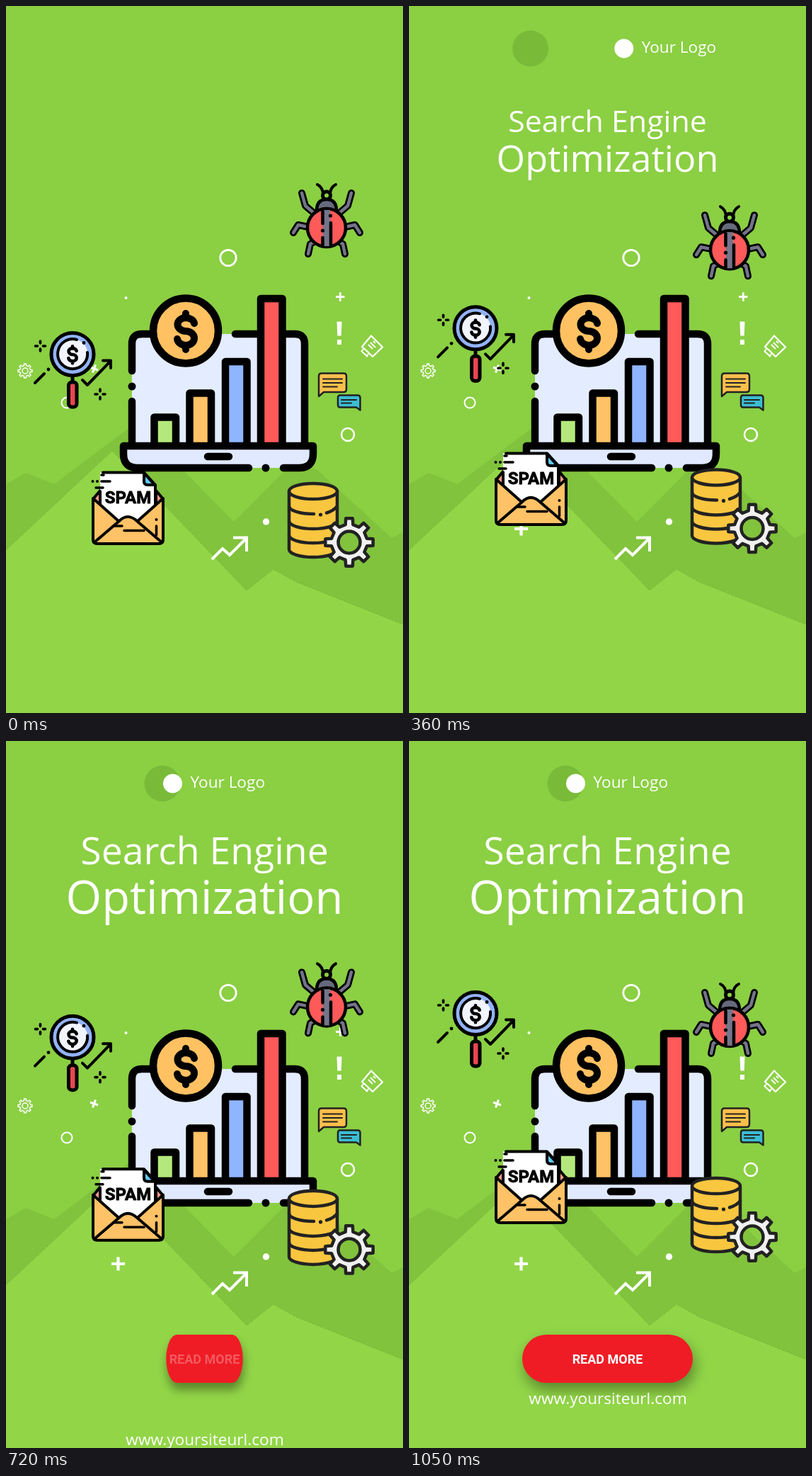
An HTML page for the animation above (1380 ms loop, 561 by 998 pixels).

```html
<!DOCTYPE html>
<html lang="en">
<head>
<meta charset="utf-8">
<title>Search Engine Optimization</title>
<style>
  html, body { margin: 0; width: 561px; height: 998px; overflow: hidden; background: #8bcf43; }
  svg, #button { position: absolute; }
  svg { left: 0; top: 0; }
  #button {
    left: 160px; top: 838px; width: 241px; height: 68px; border-radius: 34px;
    background: #ef1c25; box-shadow: 3px 10px 20px rgba(0, 0, 0, .38);
  }
  text { font-family: "Open Sans", "Noto Sans", sans-serif; fill: #fff; }
  .mid { text-anchor: middle; }
  .ink { stroke: #000; stroke-linecap: round; stroke-linejoin: round; fill: none; }
  .soft { stroke: #222; stroke-linecap: round; stroke-linejoin: round; fill: none; }
  .white { stroke: #fff; fill: none; }
  .dot { stroke: none; fill: #000; }
</style>
</head>
<body>
<svg width="561" height="998" viewBox="0 0 561 998">
  <defs>
    <!-- dollar sign around its own centre -->
    <g id="dollar" class="ink" stroke-width="10">
      <path d="M12-11A12.5 9 0 0 0 0-19A11.5 9.5 0 0 0 0 0A12 10 0 0 1 0 20A13 10 0 0 1-12 11M0-25v6M0 20v6"/>
    </g>
    <path id="spark" class="ink" stroke-width="3.6" d="M0-7v3M0 4v3M-7 0h3M4 0h3"/>
    <g id="legs">
      <path d="M418 355l5 18 13 11M406 411l7-11 14 3M427 441l3-14 10-6"/>
      <path d="M488 355l-5 18-13 11M500 411l-7-11-14 3M479 441l-3-14-10-6"/>
    </g>
  </defs>

  <rect width="561" height="998" fill="#8bcf43"/>
  <path fill="#81c33d" d="M0 675L28 659L68 675L172 597L250 655L322 728L410 640L440 655L545 751L561 743V998H0z"/>
  <path fill="#92d648" d="M0 768L150 628L340 825L378 795L410 813L561 873V998H0z"/>
  <path fill="none" stroke="#78b838" stroke-dasharray="4 2" d="M0 768L150 628L340 825L378 795L410 813L561 873"/>

  <!-- small white ornaments -->
  <g class="white" stroke-width="2.8">
    <circle cx="314" cy="355.5" r="11.2"/>
    <circle cx="86" cy="560" r="7.5" stroke-width="2"/>
    <circle cx="483" cy="605" r="9" stroke-width="2.5"/>
    <path d="M466 410.5h12.500M472.300 404.300v12.500"/>
    <path d="M119 510l11 4M126.500 506.500l-4 11" stroke-width="3"/>
    <path d="M149 738h19M158.500 728.500v19" stroke-width="4.200"/>
    <path d="M291 781L306 766L316 775L339 752M321 750.500H340V770" stroke-width="4"/>
    <g stroke-width="2.300" stroke-linejoin="round">
      <path d="M516 465.500L532 481.500L518 495L510 487L503 481z"/>
      <path d="M502 487l9 8M505 484l-3 4M513 490l-4 5M512 478l6 6M515 475l7 7M519 473l3 3" stroke-width="2"/>
    </g>
    <g transform="translate(27 515)" stroke-width="1.500" stroke-linejoin="round">
      <path id="cog"/>
      <circle r="4"/>
    </g>
  </g>
  <g fill="#fff">
    <circle cx="169.500" cy="412" r="2"/>
    <circle cx="367.500" cy="728" r="4.700"/>
    <path d="M467.500 445.500h7l-.8 20h-5.400zM468 471h6v7h-6z"/>
  </g>

  <!-- speech bubbles -->
  <g class="soft" stroke-width="2.500">
    <path fill="#fbbf4b" d="M446 518.500H477Q481 518.500 481 522.500V541Q481 545 477 545H449L442 551V522.500Q442 518.500 446 518.500z"/>
    <path stroke-width="2" d="M448 526.500h27M448 532h27M448 537.500h20"/>
    <path fill="#3bbdd2" d="M472 549.500H497Q500.500 549.500 500.500 553V570.500L495 566.500H472Q469 566.500 469 563V553Q469 549.500 472 549.500z"/>
    <path stroke-width="2" d="M474 556h21M474 560.500h14"/>
  </g>

  <!-- laptop -->
  <g class="ink" stroke-width="10.500">
    <path stroke="none" fill="#e4ecff" d="M178 620V477Q178 463 192 463H408Q422 463 422 477V620z"/>
    <path d="M178 515V477Q178 463 192 463H212M178 558V618M324 463H408Q422 463 422 477V618"/>
    <circle class="dot" cx="178" cy="537" r="5.500"/>
    <path fill="#b4e87c" d="M209.500 620V580.500H240V620"/>
    <path fill="#ffc266" d="M259.500 620V546.500H290V620"/>
    <path fill="#8fb5ff" d="M310 620V502H340.500V620"/>
    <path fill="#ff5a5a" d="M360 620V413H390.500V620"/>
    <path stroke="none" fill="#e0e9ff" d="M166 621H434V632Q434 652 414 652H186Q166 652 166 632z"/>
    <path d="M343 652H186Q166 652 166 632V621H434V632Q434 652 414 652H392M285 636H315"/>
    <circle class="dot" cx="367" cy="652" r="5.500"/>
    <circle cx="254" cy="458.500" r="46" fill="#ffc162"/>
    <use href="#dollar" x="254" y="459"/>
  </g>

  <g id="bug">
    <use href="#legs" class="ink" stroke-width="10"/>
    <use href="#legs" class="ink" style="stroke:#74758a" stroke-width="4.500"/>
    <g class="ink" stroke-width="4.500">
      <path stroke-width="4" d="M448 358Q448 347 440 343M458 358Q458 347 466 343"/>
      <circle cx="453" cy="358.500" r="5.500" stroke-width="5"/>
      <path fill="#666a7c" d="M439 380Q439 364 453 364Q467 364 467 380z"/>
      <circle cx="453" cy="404" r="27" fill="#ff5a5a"/>
      <path stroke="none" fill="#74758a" d="M448 379h10v51h-10z"/>
      <path d="M447.500 381V398M447.500 418V430M459 397V429" />
      <circle class="dot" cx="447.500" cy="408" r="2.600"/>
      <circle class="dot" cx="458.500" cy="387" r="2.600"/>
    </g>
  </g>

  <g id="lens" class="ink" stroke-width="5">
    <path d="M94 414V424"/>
    <rect x="88.500" y="424" width="11.500" height="35" rx="4.500" fill="#ea4650"/>
    <circle cx="94" cy="384.500" r="30" fill="#93b3fa"/>
    <circle cx="94" cy="384.500" r="21.500" fill="#f2f5ff" stroke="none"/>
    <path stroke-width="4" d="M100 364A21 21 0 1 0 115 382"/>
    <circle class="dot" cx="110" cy="368.500" r="2.400"/>
    <use href="#dollar" transform="translate(94 385) scale(.47)"/>
    <use href="#spark" x="48.500" y="373"/>
    <use href="#spark" x="133" y="441"/>
    <path stroke-width="4" d="M41 425L54 412M108 421L115 428L147 395M137 393.500H148V404"/>
    <circle class="dot" cx="60" cy="406" r="2.400"/>
  </g>

  <g id="mail" class="ink" stroke-width="4">
    <path fill="#ff9c8e" d="M123 617L133 605V630zM222 617L212 605V630z"/>
    <path stroke="none" fill="#fff" d="M133 645V579.500H195L211 597V645L172 660z"/>
    <path d="M133 628V606M137 579.500H195L211 597V628"/>
    <path fill="#62c8f2" d="M195 580V592Q195 597 200 597H210z"/>
    <path stroke="none" fill="#ffc266" d="M123 616L160 649Q172 637 185 649L222 616V674Q222 680 216 680H129Q123 680 123 674z"/>
    <path d="M123 616V674Q123 680 129 680H216Q222 680 222 674V616M123 616L159 648M222 616L186 648M125 678L160 648Q172 636 185 648L220 678"/>
    <path stroke-width="3.500" d="M152 655H164M167 661.500H195M212.500 655V668M135 583H138M135 592H147M127 601H137"/>
    <circle class="dot" cx="212.500" cy="646" r="2"/>
    <circle class="dot" cx="122.500" cy="592" r="2"/>
    <circle class="dot" cx="129" cy="592" r="2"/>
    <text class="mid" x="172.500" y="623" font-size="24" font-weight="700" stroke="#000" stroke-width=".8"
      style="fill:#000;font-family:Roboto,sans-serif">SPAM</text>
  </g>

  <g id="data" class="soft" stroke-width="4.500">
    <path fill="#f9c640" d="M400 628V710A34 11 0 0 0 468 710V628"/>
    <ellipse cx="434" cy="628" rx="34" ry="11" fill="#f9c640"/>
    <path d="M400 649A34 11 0 0 0 435 660M453 658.500Q464 655 468 649M400 670A34 11 0 0 0 468 670M400 690A34 11 0 0 0 468 690"/>
    <circle cx="444.500" cy="661" r="2.600" fill="#222" stroke="none"/>
    <g transform="translate(485 700)">
      <path id="gear" fill="#f1f1f1" fill-rule="evenodd"/>
    </g>
  </g>
</svg>

<div id="button"></div>

<svg width="561" height="998" viewBox="0 0 561 998">
  <circle id="disc" cx="221" cy="60" r="25.500" fill="#7aba39"/>
  <g id="brand">
    <circle cx="235.500" cy="60" r="13.500" fill="#fff"/>
    <text x="260.500" y="65.500" font-size="22.600">Your Logo</text>
  </g>
  <g id="title" class="mid">
    <text x="280.500" y="174" font-size="53.500">Search Engine</text>
    <text x="280.500" y="244" font-size="65">Optimization</text>
  </g>
  <text id="more" class="mid" x="280.500" y="878.500" font-size="18" font-weight="700"
    style="font-family:Roboto,sans-serif">READ MORE</text>
  <text id="url" class="mid" x="281" y="936" font-size="22.600">www.yoursiteurl.com</text>
</svg>

<script>
  const LOOP = 1380, TICK = 30, END = 1050;
  const $ = id => document.getElementById(id);

  function gearPath(teeth, outer, inner) {
    const step = 2 * Math.PI / teeth, pts = [];
    for (let i = 0; i < teeth; i++) {
      for (const [r, k] of [[inner, -.27], [outer, -.18], [outer, .18], [inner, .27]]) {
        const a = (i + k) * step;
        pts.push((r * Math.sin(a)).toFixed(2) + ' ' + (-r * Math.cos(a)).toFixed(2));
      }
    }
    return 'M' + pts.join('L') + 'z';
  }
  const hole = r => `M${r} 0A${r} ${r} 0 1 0 ${-r} 0A${r} ${r} 0 1 0 ${r} 0z`;
  $('cog').setAttribute('d', gearPath(8, 10, 7.5));
  $('gear').setAttribute('d', gearPath(8, 34, 25.5) + hole(15.5));

  const moveX = (el, v) => el.setAttribute('transform', `translate(${v} 0)`);
  const moveY = (el, v) => el.setAttribute('transform', `translate(0 ${v})`);
  const zoom = (el, v) =>
    el.setAttribute('transform', `translate(280.5 194.5) scale(${v}) translate(-280.5 -194.5)`);
  const widen = (el, v) => { el.style.transform = `scaleX(${v})`; };
  const fade = (el, v) => { el.style.opacity = v; };

  // id, setter, start ms, end ms, from, to (all linear)
  const tracks = [
    ['bug', moveY, 0, END, -91, 0],
    ['lens', moveY, 0, END, 107, 0],
    ['mail', moveY, 0, END, 79, 0],
    ['data', moveY, 0, END, 57, 0],
    ['disc', moveX, 0, 450, -247, 0],
    ['brand', moveX, 0, 450, 341, 0],
    ['title', zoom, 0, 450, .005, 1],
    ['button', widen, 450, END, 0, 1],
    ['more', fade, 600, END, 0, 1],
    ['url', moveY, 600, END, 79, 0],
  ].map(([id, ...rest]) => [$(id), ...rest]);

  function draw(ms) {
    const t = Math.floor(ms / TICK) * TICK;
    for (const [el, set, start, end, from, to] of tracks) {
      const p = Math.min(1, Math.max(0, (t - start) / (end - start)));
      set(el, from + (to - from) * p);
    }
  }

  const began = performance.now();
  function frame() {
    draw((performance.now() - began) % LOOP);
    requestAnimationFrame(frame);
  }
  frame();
</script>
</body>
</html>
```
